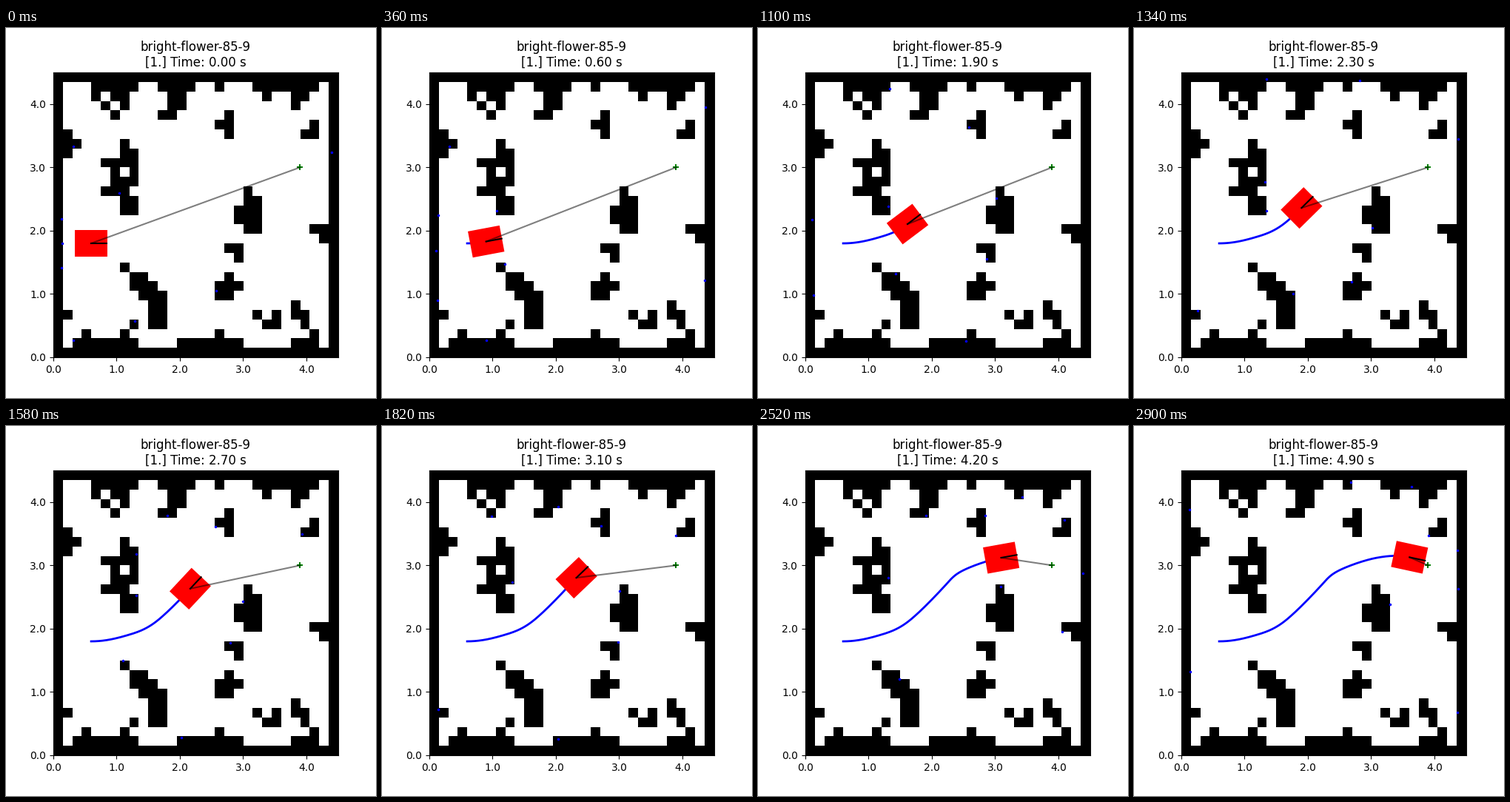
Recreate the animation shown at these times as a matplotlib script. Size 500 by 500 pixels, loop 2920 ms.

```python
import numpy as np
import matplotlib.pyplot as plt
from matplotlib.animation import FuncAnimation
from matplotlib.patches import Polygon

SIZE, CELLS = 4.5, 30
CELL = SIZE / CELLS
GOAL = (3.9, 3.0)
TICK_MS, TICKS = 20, 146

# Waypoints: time, x, y, heading in degrees.
WAYPOINTS = np.array([
    (0.0, 0.600, 1.800, 0.0),
    (1.1, 1.160, 1.893, 16.3),
    (1.9, 1.616, 2.104, 37.0),
    (2.7, 2.165, 2.632, 46.9),
    (3.5, 2.510, 2.928, 25.7),
    (4.2, 3.096, 3.121, 10.2),
    (4.9, 3.607, 3.128, -12.2),
])
TIMES, POINTS = WAYPOINTS[:, 0], WAYPOINTS[:, 1:3]

# Obstacles by (width, height): their top left (column, row).
BLOCKS = {
    (7, 1): [(21, 1), (2, 28), (13, 28)],
    (5, 1): [(4, 1)],
    (4, 1): [(11, 1), (5, 9)],
    (3, 1): [(6, 11), (5, 12), (25, 28)],
    (2, 1): [(6, 2), (11, 4)],
    (1, 3): [(18, 4), (1, 6)],
    (1, 2): [(19, 14)],
    (2, 2): [(12, 2), (7, 13), (20, 13), (20, 15), (17, 22), (10, 25)]
            + [(8 + i, 21 + i) for i in range(3)],
    (1, 1): [(4 + i, 2 + i) for i in range(3)]
            + [(18 + i, 21 + i) for i in range(2)]
            + [(col, 27) for col in (3, 7, 17, 27)]
            + [(17, 1), (22, 2), (7, 3), (17, 5), (2, 7), (6, 10), (8, 10),
               (20, 12), (7, 20), (1, 25), (21, 25), (8, 26), (26, 26)],
}
# Two by two hooks by the (dx, dy) of their open corner.
HOOKS = {
    (0, 0): [(26, 5), (22, 25)],
    (1, 0): [(7, 7), (25, 24)],
    (0, 1): [(27, 16), (18, 18)],
    (1, 1): [(25, 2)],
}

RAYS = np.radians(39.8) * np.arange(1, 5)
RAYS = np.pi + np.concatenate([[0], RAYS, -RAYS])
RANGES = np.arange(0.01, 6.4, 0.05)


def build_grid():
    grid = np.ones((CELLS, CELLS))
    grid[1:-1, 1:-1] = 0
    for (dx, dy), corners in HOOKS.items():
        for col, row in corners:
            grid[row:row + 2, col:col + 2] = 1
            grid[row + dy, col + dx] = 0
    for (w, h), corners in BLOCKS.items():
        for col, row in corners:
            grid[row:row + h, col:col + w] = 1
    return grid


def waypoint_velocity():
    speed = np.hypot(*np.gradient(POINTS, TIMES, axis=0).T)
    ang = np.radians(WAYPOINTS[:, 3])
    return np.column_stack([speed * np.cos(ang), speed * np.sin(ang)])


def pose(t):
    """Position and heading on a cubic Hermite curve through the waypoints."""
    t = np.asarray(t, float)
    i = np.clip(np.searchsorted(TIMES, t, side="right") - 1, 0, len(TIMES) - 2)
    dt = (TIMES[i + 1] - TIMES[i])[..., None]
    u = (t - TIMES[i])[..., None] / dt
    a, b = POINTS[i], POINTS[i + 1]
    va, vb = velocity[i] * dt, velocity[i + 1] * dt
    c2 = 3 * (b - a) - 2 * va - vb
    c3 = 2 * (a - b) + va + vb
    point = a + u * (va + u * (c2 + u * c3))
    slope = va + u * (2 * c2 + 3 * u * c3)
    return point, np.arctan2(slope[..., 1], slope[..., 0])


def scan(center, heading):
    """March each ray until it enters an occupied cell."""
    ang = heading + RAYS
    x = center[0] + np.outer(np.cos(ang), RANGES)
    y = center[1] + np.outer(np.sin(ang), RANGES)
    col = np.clip((x / CELL).astype(int), 0, CELLS - 1)
    row = np.clip(((SIZE - y) / CELL).astype(int), 0, CELLS - 1)
    hit = np.argmax(grid[row, col] > 0, axis=1)
    ray = np.arange(len(ang))
    return x[ray, hit], y[ray, hit]


grid = build_grid()
velocity = waypoint_velocity()
body_shape = np.array([(-1, -1), (1, -1), (1, 1), (-1, 1)]) * (0.254, 0.21)

fig, ax = plt.subplots(figsize=(5, 5), dpi=100)
ax.imshow(grid[::-1], cmap="gray_r", vmin=0, vmax=1, origin="lower",
          extent=(0, SIZE, 0, SIZE), interpolation="nearest")
ax.set(xlim=(0, SIZE), ylim=(0, SIZE))
labels = [f"{v}.0" for v in range(5)]
ax.set_xticks(range(5), labels)
ax.set_yticks(range(5), labels)

trail, = ax.plot([], [], color="blue", lw=2, zorder=1)
body = Polygon(body_shape, closed=True, color="red", lw=0, zorder=1.5)
ax.add_patch(body)
ax.scatter(*GOAL, marker="+", s=36, color="green", zorder=1.8)
to_goal, = ax.plot([], [], color="black", alpha=0.5, lw=1.5)
nose, = ax.plot([], [], color="black", lw=1.5)
hits, = ax.plot([], [], "o", color="blue", ms=1, mew=1.5, zorder=3)
title = ax.set_title("")


def update(tick):
    # Steps alternate between one tick and five ticks.
    pair, rest = divmod(tick, 6)
    t = (2 * pair + (rest > 0)) / 10

    center, heading = pose(t)
    c, s = np.cos(heading), np.sin(heading)
    path, _ = pose(np.linspace(0, t, int(t * 50) + 2))
    trail.set_data(path[:, 0], path[:, 1])
    body.set_xy(center + body_shape @ np.array([(c, s), (-s, c)]))
    to_goal.set_data([center[0], GOAL[0]], [center[1], GOAL[1]])
    nose.set_data([center[0], center[0] + 0.25 * c],
                  [center[1], center[1] + 0.25 * s])
    hits.set_data(*scan(center, heading))
    title.set_text(f"bright-flower-85-9\n[1.] Time: {t:.2f} s")
    return trail, body, to_goal, nose, hits, title


anim = FuncAnimation(fig, update, frames=TICKS, interval=TICK_MS,
                     repeat=True, repeat_delay=0, blit=False)
plt.show()
```
